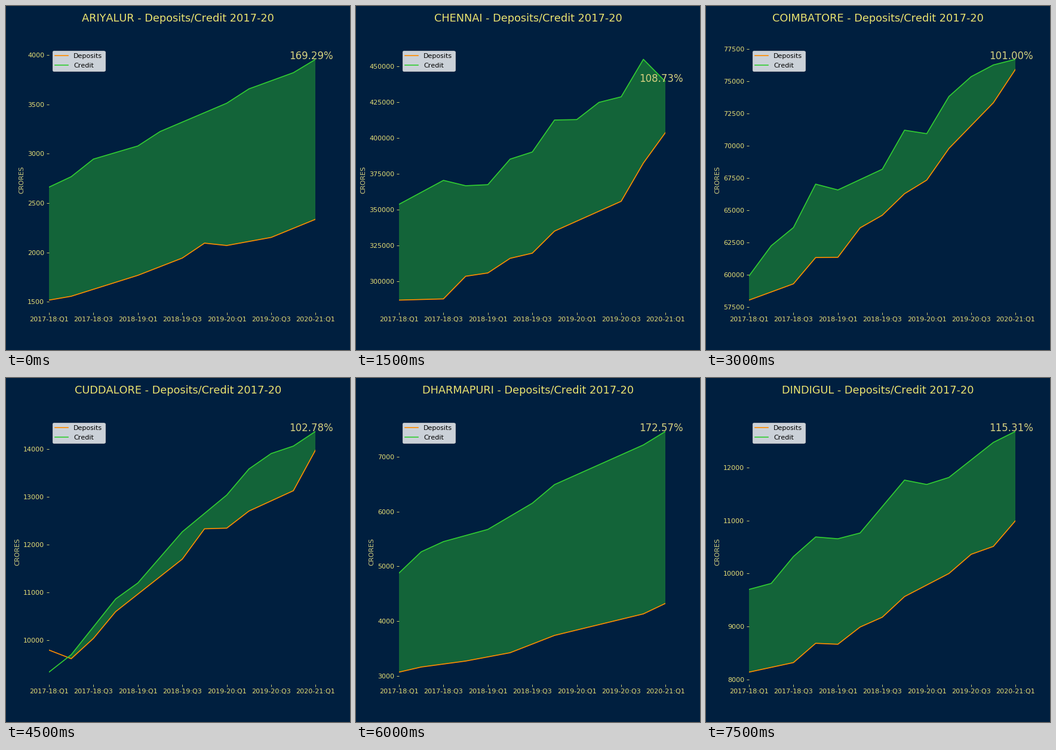
Write a matplotlib script that moves like this. It is 576 px wide and 576 px high and loops after 8000 ms.

```python
import numpy as np
import matplotlib.pyplot as plt
from matplotlib.animation import FuncAnimation

NAVY = "#001f3f"
TITLE = "#ebe370"
LABEL = "#e6de76"
MUTED = "#d6d080"
STEP_MS = 500
STEPS_PER_DISTRICT = 3
STEPS = 16

X = np.arange(13)
QUARTERS = [f"20{17 + x // 4}-{18 + x // 4}:Q{x % 4 + 1}" for x in X]

districts = []
_ = np.nan  # a quarter on the straight line between its neighbours


def fill_gaps(keys):
    keys = np.array(keys, dtype=float)
    known = ~np.isnan(keys)
    return np.interp(X, X[known], keys[known])


def district(name, percent, deposits, credit):
    """Add a district; its closing credit is the given percent of deposits."""
    closing = deposits[-1] * percent / 100
    districts.append((name, percent, fill_gaps(deposits), fill_gaps(credit + [closing])))


district("ARIYALUR", 169.29,
         [1518, 1557, _, _, 1769, _, 1944, 2095, 2071, _, 2153, _, 2337],
         [2662, 2768, 2946, _, 3079, 3225, _, _, 3512, 3657, _, 3821])
district("CHENNAI", 108.73,
         [286950, _, 287800, 303600, 305900, 316100, 319700, 335100, _, _, 355900, 382600, 404000],
         [353800, _, 370500, 366750, 367500, 385300, 390300, 412600, 412900, 424900, 428800, 454950])
district("COIMBATORE", 101.00,
         [58040, _, 59303, 61340, 61358, 63640, 64620, 66288, 67343, 69797, _, 73338, 75945],
         [59914, 62252, 63664, 67030, 66580, _, 68186, 71209, 70941, 73825, 75361, 76269])
district("CUDDALORE", 102.78,
         [9796, 9615, 10040, 10600, _, _, 11699, 12334, 12347, 12705, _, 13131, 13985],
         [9334, 9699, _, 10865, 11200, _, 12271, _, 13040, 13586, 13909, 14065])
district("DHARMAPURI", 172.57,
         [3070, 3163, _, 3272, _, 3424, _, 3740, _, _, _, 4133, 4326],
         [4879, 5266, 5452, _, 5675, _, 6153, 6493, _, _, _, 7217])
district("DINDIGUL", 115.31,
         [8140, _, 8320, 8684, 8666, 8991, 9177, 9566, _, 10002, 10364, 10513, 11001],
         [9701, 9814, 10321, 10691, 10657, 10766, _, 11764, 11682, 11815, _, 12476])

plt.rcParams["font.family"] = "DejaVu Sans"
plt.rcParams["text.kerning_factor"] = 6
fig, ax = plt.subplots(figsize=(7.2, 7.2), dpi=80, facecolor=NAVY)
title = fig.suptitle("", fontsize=16, color=TITLE)


def draw(step):
    name, percent, deposits, credit = districts[step // STEPS_PER_DISTRICT]
    ax.clear()
    ax.set_facecolor(NAVY)
    ax.spines[:].set_visible(False)
    ax.margins(x=0)

    ax.plot(X, deposits, color="darkorange", label="Deposits")
    ax.plot(X, credit, color="limegreen", label="Credit")
    ax.fill_between(X, deposits, credit, where=credit > deposits,
                    interpolate=True, facecolor="limegreen", alpha=0.4, lw=0)
    ax.text(10.8, credit[-1], f"{percent:.2f}%", fontsize=15, color=MUTED)

    title.set_text(f"{name} - Deposits/Credit 2017-20")
    ax.set_ylabel("CRORES", color=MUTED)
    ax.set_xticks(X[::2], QUARTERS[::2])
    ax.tick_params(colors=LABEL)
    ax.legend(loc="upper left")
    return []


anim = FuncAnimation(fig, draw, frames=STEPS, init_func=lambda: draw(0),
                     interval=STEP_MS, repeat=True, repeat_delay=0)
plt.show()
```
